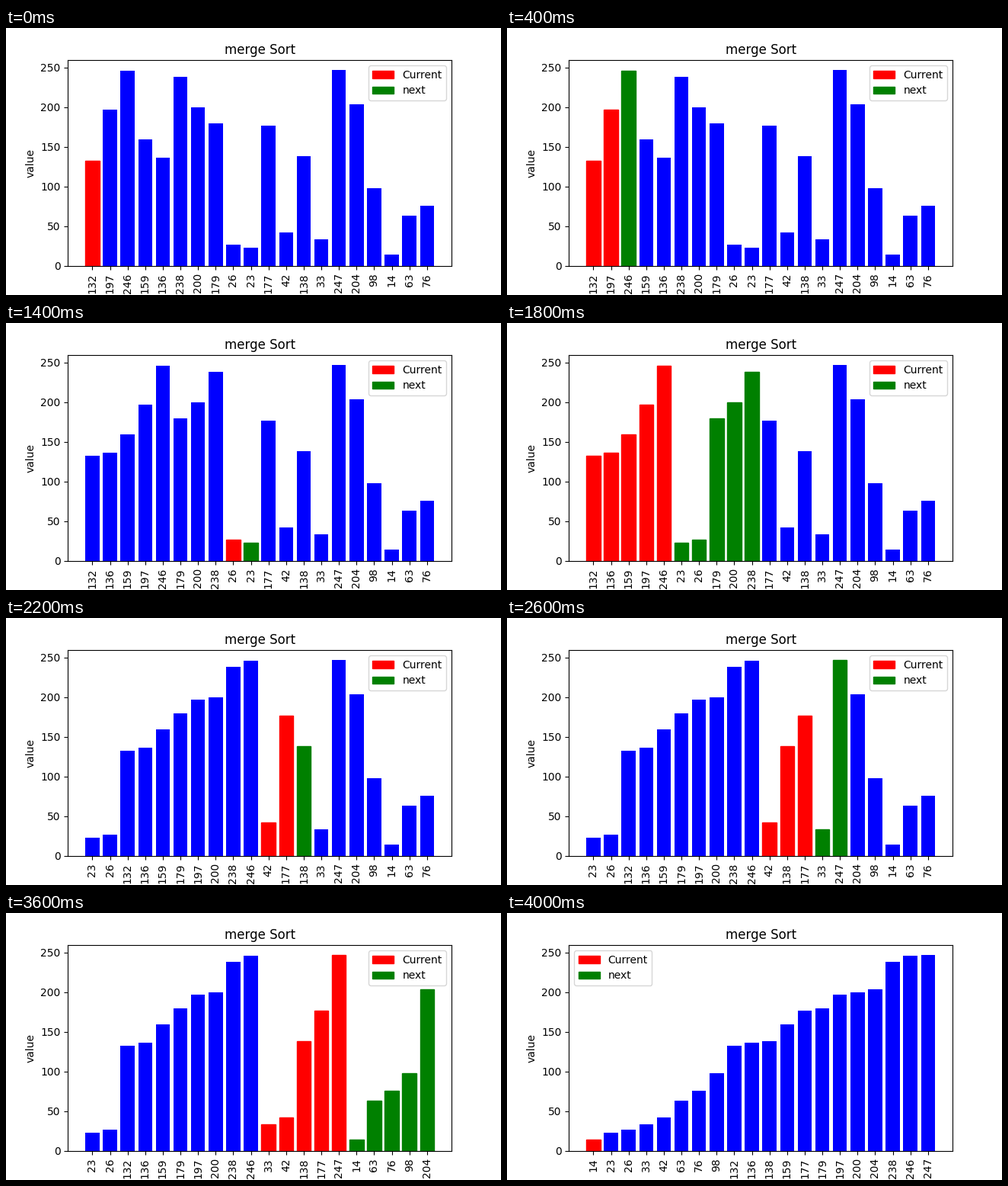
A matplotlib script that plays this animation: 650x350 px, repeating every 5 s.

```python
import matplotlib.pyplot as plt
from matplotlib.animation import FuncAnimation
from matplotlib.patches import Patch

VALUES = [132, 197, 246, 159, 136, 238, 200, 179, 26, 23,
          177, 42, 138, 33, 247, 204, 98, 14, 63, 76]
N = len(VALUES)
STEP_MS, LOOP_MS = 200, 5000


def merge_sort(data, lo, hi):
    """Sort data[lo:hi] in place, yielding a snapshot before every merge."""
    if hi - lo < 2:
        return
    mid = (lo + hi + 1) // 2
    yield from merge_sort(data, lo, mid)
    yield from merge_sort(data, mid, hi)
    yield data[:], range(lo, mid), range(mid, hi)
    data[lo:hi] = sorted(data[lo:hi])


data = VALUES[:]
steps = [(VALUES, range(1), range(0)), *merge_sort(data, 0, N)]
steps.append((data, range(1), range(0)))

plt.rcParams["font.family"] = "DejaVu Sans"
fig, ax = plt.subplots(figsize=(6.5, 3.5), dpi=100)
bars = ax.bar(range(N), VALUES, color="blue")
ax.set_title("merge Sort")
ax.set_ylabel("value")
ax.set_xticks(range(N), VALUES, rotation=90)
legend = ax.legend(handles=[Patch(color="red", label="Current"),
                            Patch(color="green", label="next")],
                   loc="upper right")


def update(i):
    heights, left, right = steps[min(i, len(steps) - 1)]
    for j, (bar, h) in enumerate(zip(bars, heights)):
        bar.set_height(h)
        if j in left:
            bar.set_color("red")
        elif j in right:
            bar.set_color("green")
        else:
            bar.set_facecolor("blue")
            bar.set_edgecolor("none")
    ax.set_xticklabels(heights)
    # the legend moves aside once the tall bars reach the right end
    legend.set_loc("upper left" if heights[-1] == max(VALUES) else "upper right")
    return [*bars, legend]


anim = FuncAnimation(fig, update, frames=LOOP_MS // STEP_MS,
                     interval=STEP_MS, repeat=True, repeat_delay=0)
plt.show()
```
